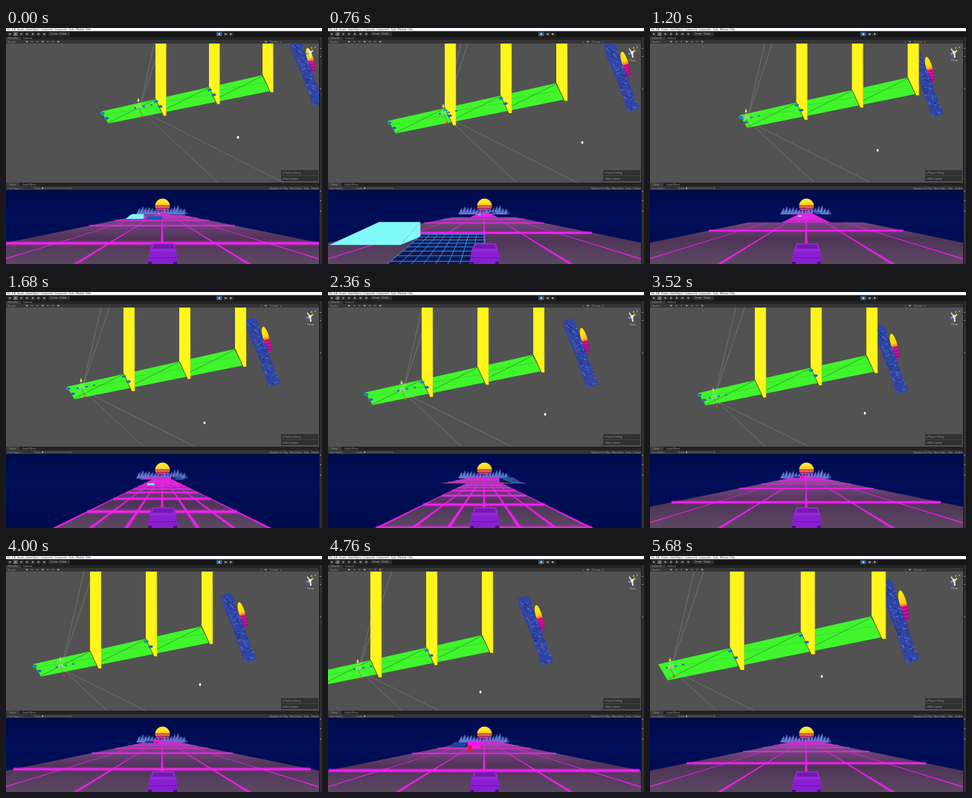
Recreate the animation shown at these times as an HTML page with a canvas. Size 425x319 px, loop 5.72 s.

```html
<!DOCTYPE html>
<html lang="en">
<head>
<meta charset="utf-8">
<title>Retro racer in the editor</title>
<style>
html, body { margin: 0; width: 100%; height: 100%; overflow: hidden; background: #282828; }
canvas { display: block; width: 425px; height: 319px; }
</style>
</head>
<body>
<canvas id="stage" width="425" height="319"></canvas>
<script>
const g = document.getElementById('stage').getContext('2d');
const LOOP = 5720, STEP = 40;

// Per pose: time, first wall x y, zoom, car x y, mountains x y, cursor x y, distance driven
const POSES = [
  [0, 201, 95.5, .96, 178, 107, 404, 60, 312, 148, 0],
  [760, 157, 107.5, 1, 155, 115, 394, 66, 342, 155, 2.6],
  [1680, 158, 110, 1, 101, 129, 344.5, 81, 267, 177, 6.5],
  [3040, 169, 109, 1, 97, 135, 334, 84.5, 317, 154, 11.75],
  [4000, 113, 128, 1, 73, 149, 312, 96.5, 261, 174, 15.94],
  [4760, 57, 140, 1, 40, 152, 278.5, 100.5, 205, 184, 18.98],
  [5680, 107.5, 123.5, 1.27, 27, 150, 334.5, 88, 231, 163, 22.72],
  [5720, 107.5, 123.5, 1.27, 27, 150, 334.5, 88, 231, 163, 22.88]
];
const TILE = [75, -16.5];
const WRAPS = [810, 3000, 5193];
const wrapsAt = t => WRAPS.filter(w => t >= w).length;

const noise = n => { const v = Math.sin(n * 127.1) * 43758.5453; return v - Math.floor(v); };

function poly(points, fill, stroke, width = 1) {
  g.beginPath();
  points.forEach(p => g.lineTo(p[0], p[1]));
  g.closePath();
  if (fill) { g.fillStyle = fill; g.fill(); }
  if (stroke) { g.strokeStyle = stroke; g.lineWidth = width; g.stroke(); }
}
function line(a, b, color, width = 1) {
  g.strokeStyle = color;
  g.lineWidth = width;
  g.beginPath();
  g.moveTo(a[0], a[1]);
  g.lineTo(b[0], b[1]);
  g.stroke();
}
function rect(x, y, w, h, color) { g.fillStyle = color; g.fillRect(x, y, w, h); }
function dot(x, y, r, color) {
  g.fillStyle = color;
  g.beginPath();
  g.arc(x, y, r, 0, 7);
  g.fill();
}
function text(s, x, y, color = '#999', size = 3.2) {
  g.fillStyle = color;
  g.font = size + 'px Inter, Arial, sans-serif';
  g.fillText(s, x, y);
}
function clipTo(x, y, w, h, draw) {
  g.save();
  g.beginPath();
  g.rect(x, y, w, h);
  g.clip();
  draw();
  g.restore();
}
function gradient(y0, y1, ...stops) {
  const fill = g.createLinearGradient(0, y0, 0, y1);
  stops.forEach(([at, color]) => fill.addColorStop(at, color));
  return fill;
}

function poseAt(t) {
  let i = 0;
  while (i < POSES.length - 2 && t >= POSES[i + 1][0]) i++;
  const a = POSES[i], b = POSES[i + 1], u = (t - a[0]) / (b[0] - a[0]);
  const mix = j => a[j] + (b[j] - a[j]) * u;
  // The track jumps one tile ahead at each wrap; remove the jumps before mixing
  const base = (p, j) => p[j] - wrapsAt(p[0]) * TILE[j - 1] * p[3];
  const zoom = mix(3);
  const track = j => base(a, j) + (base(b, j) - base(a, j)) * u + wrapsAt(t) * TILE[j - 1] * zoom;
  return {
    wall: [track(1), track(2)], zoom, tile: wrapsAt(t),
    car: [mix(4), mix(5)], range: [mix(6), mix(7)], cursor: [mix(8), mix(9)], dist: mix(10)
  };
}

function sideRange([x, y], zoom) {
  g.save();
  g.translate(x, y);
  g.scale(1 + (zoom - 1) * .5, 1 + (zoom - 1) * .8);
  g.save();
  g.translate(5.5, -17);
  g.rotate(-.24);
  g.beginPath();
  g.ellipse(0, 0, 4.6, 17.5, 0, 0, 7);
  g.fillStyle = gradient(-18, 18, [0, '#fff200'], [.4, '#ffd400'], [.48, '#ff8a20'], [.53, '#e8108c'], [1, '#c000b0']);
  g.fill();
  for (let i = 0; i < 4; i++) rect(-5, 2 + i * 4, 10, .8, '#8a0870');
  g.restore();
  const at = (u, v) => [17 * u + 7.5 * v, 45 * u - 2 * v];
  const edge = [];
  for (let i = 0; i <= 16; i++) edge.push(at(i / 8 - 1, -.85 - noise(i) * .3));
  for (let i = 16; i >= 0; i--) edge.push(at(i / 8 - 1, .8 + noise(i + 40) * .4));
  poly(edge, '#3145a4');
  for (let i = 0; i < 90; i++) {
    const u = noise(i + 100) * 1.9 - .95, v = noise(i + 300) * 1.7 - .9;
    line(at(u, v), at(u + noise(i) * .1 - .02, v + .4 * noise(i + 7)), i % 2 ? '#1b2872' : '#6a82dc', .8);
  }
  g.restore();
}

function gizmo() {
  line([409, 34], [405, 28], '#ddd', 1.5);
  line([409, 34], [413, 30], '#e8c93a', 2);
  line([409, 34], [410, 40], '#eee', 2);
  line([409, 34], [404, 35], '#58a8f0', 2);
  dot(409, 33, 2, '#f4f4f4');
  dot(411, 27, 1, '#9be04a');
  dot(416, 26, .8, '#ccc');
  text('Persp', 405.5, 45, '#ccc', 3);
}

function sceneView(p) {
  rect(0, 21, 421, 188, '#525252');
  sideRange(p.range, p.zoom);

  const at = (x, y, n = 0) => [p.wall[0] + (x + n * TILE[0]) * p.zoom, p.wall[1] + (y + n * TILE[1]) * p.zoom];
  poly([at(-76, 18), at(0, 0, 2), at(12, 22, 2), at(-66, 35)], '#40f52c');
  for (let n = 0; n < 3; n++) {
    line(at(-66, 34, n), at(0, 1, n), '#1d7d19', .6);
    line(at(-73, 23, n), at(5, 10, n), '#2fc024', .4);
  }
  line(at(0, 0, 2), at(12, 22, 2), '#183c14', 2);

  for (let n = 2; n >= 0; n--) {
    const foot = [at(0, 0, n), at(11, 24, n), at(15, 24, n)];
    poly([[foot[0][0], 20], ...foot, [foot[2][0], 20]], '#fff51c');
    line(foot[0], foot[1], '#4c5a10', .9);
    line([foot[2][0] - .3, 21], foot[2], '#c9c414', .6);
  }
  for (let n = 0; n < 3; n++) {
    if (p.tile + n === 3) continue;
    [[-76, 20], [-70, 27]].forEach(([x, y], i) => {
      const [bx, by] = at(x, y, n);
      poly([[bx - 2, by], [bx + 2, by - 1.5], [bx + 5, by], [bx + 4, by + 2], [bx, by + 3]], i ? '#247fae' : '#1a9ac8');
      line([bx, by + 1], [bx + 4, by], '#155080', .8);
    });
  }

  const [cx, cy] = p.car;
  const ray = 'rgba(205,205,205,.4)';
  [.25, .35].forEach(k => line([cx + 2, cy], [cx + k * (cy - 21), 21], ray, .6));
  [1.05, 1.92].forEach(k => line([cx + 4, cy + 5], [cx + k * (209 - cy), 209], ray, .6));
  [[-6, 0], [6, -2], [16, -4]].forEach(([x, y]) => rect(cx + x, cy + y, 3, 2, '#2678b8'));
  poly([[cx - 3, cy - 1], [cx + 3, cy - 3], [cx + 4, cy + 1], [cx - 2, cy + 2]], '#62e878', '#b5dcae', .6);
  line([cx, cy], [cx, cy - 9], '#a8e83a', .8);
  poly([[cx - 1.7, cy - 8], [cx, cy - 13], [cx + 1.7, cy - 8]], '#e6e86a');
  line([cx, cy], [cx + 5, cy + 11], '#a85c28', .6);
  dot(cx + 5, cy + 13, 1.4, '#e8362a');

  const [mx, my] = p.cursor;
  dot(mx, my, 1.5, '#fff');
  rect(mx - 1, my - 2, 2, 2, '#eee');
  gizmo();

  rect(370, 192, 50, 15, '#303030');
  rect(370, 199, 50, 1, '#434343');
  text('▸ Physics Debug', 372, 197, '#a0a0a0', 3);
  text('▸ Main Camera', 372, 205, '#a0a0a0', 3);
}

// Road space: x across, h height, z depth
const project = (x, h, z) => [210 + 45 * x / z, 247 + (37 - h) / z];
const NEAR = .5, FAR = 12;

function backdrop() {
  rect(0, 219, 421, 100, gradient(219, 319, [0, '#000a4b'], [.35, '#000e59'], [1, '#000b4d']));
  g.beginPath();
  g.arc(210.5, 240.5, 10, 0, 7);
  g.fillStyle = gradient(230, 250, [0, '#fff23a'], [.38, '#ffd62c'], [.55, '#ff8a28'], [.75, '#e82a78'], [1, '#c010a0']);
  g.fill();
  for (let i = 0; i < 4; i++) rect(200, 240 + i * 3, 21, .8, '#7c1560');
  for (let i = 0; i < 15; i++) {
    const x = 180 + i * 4.3, away = Math.abs(x - 210) / 33;
    const top = 251 - 5 - 8 * noise(i + 3) * Math.sin(Math.PI * Math.min(1, away * .8 + .1));
    poly([[x - 5, 252], [x, top], [x + 1, 252]], '#5f78cc');
    poly([[x, top], [x + 5, 252], [x + 1, 252]], '#293a8c');
  }
}

function roadPart(from, to, dist, half, cell, row) {
  const z0 = Math.max(from - dist, NEAR), z1 = Math.min(to - dist, FAR);
  if (z0 >= z1) return;
  const shape = [project(-half, 0, z0), project(-half, 0, z1), project(half, 0, z1), project(half, 0, z0)];
  poly(shape, gradient(249, 319, [0, '#9a4aa6'], [.15, '#7b4786'], [.5, '#4e3557'], [1, '#5c4863']));
  // A vertical wedge from the near edge to the far one
  const wedge = (x, size, color) => {
    const a = project(x, 0, z0), b = project(x, 0, z1), w = size / z0 / 2, v = size / z1 / 2;
    poly([[a[0] - w, a[1]], [b[0] - v, b[1]], [b[0] + v, b[1]], [a[0] + w, a[1]]], color);
  };
  const count = Math.floor(half / cell - .01);
  for (let i = -count; i <= count; i++) {
    wedge(i * cell, 4.5, 'rgba(245,30,240,.25)');
    wedge(i * cell, 2.2, '#f51df2');
  }
  for (let n = Math.ceil((z0 + dist - .84) / row); n * row + .84 < z1 + dist; n++) {
    const z = n * row + .84 - dist;
    if (z < z0) continue;
    const a = project(-half, 0, z), b = project(half, 0, z), w = Math.min(3.2, 2.6 / z);
    line(a, b, 'rgba(245,30,240,.25)', w * 2.2);
    line(a, b, '#f820f4', w);
  }
}

// A sloped block: [left, right] at the front and at the back, height at the back
function ramp(dist, front, back, z, depth, height, fill, wire) {
  const zb = z + depth - dist, zf = Math.max(z - dist, .35);
  if (zb < .42 || zf > FAR) return;
  const at = (u, v) => {
    const x = (front[0] + (front[1] - front[0]) * u) * (1 - v) + (back[0] + (back[1] - back[0]) * u) * v;
    return project(x, height * v, zf + (zb - zf) * v);
  };
  const inner = front[0] > 0 ? 0 : 1;
  const steps = [0, .2, .4, .6, .8, 1];
  poly([at(inner, 0), ...steps.map(v => at(inner, v)), project(back[inner], 0, zb)], wire ? '#0c1c52' : fill);
  poly([...steps.map(v => at(0, v)), ...steps.map(v => at(1, 1 - v))], fill);
  if (!wire) return;
  const w = Math.min(1, 1.1 / zb);
  for (let i = 0; i <= 8; i++) {
    line(at(i / 8, 0), at(i / 8, 1), wire, w);
    line(at(0, i / 8), at(1, i / 8), wire, w);
  }
}

function block(dist, x0, x1, z, height, fill) {
  const d = z - dist;
  if (d < .4 || d > FAR) return;
  poly([project(x0, 0, d), project(x0, height, d), project(x1, height, d), project(x1, 0, d)], fill);
}

function car() {
  poly([[197, 291], [226, 291], [229, 300], [231, 319], [190, 319], [193, 300]], '#8a1fd0');
  poly([[198, 292], [225, 292], [227, 299], [196, 299]], '#7418b0', '#a93fe0', .7);
  line([193, 301], [229, 301], '#a638e0', .8);
  rect(193, 310, 36, 1, '#6d14a4');
  rect(191, 316, 5, 3, '#4d1278');
  rect(225, 316, 5, 3, '#4d1278');
}

function gameView(d) {
  backdrop();
  roadPart(12.2, 99, d, 4, 4 / 3, 1);
  roadPart(6.8, 12.2, d, 1.66, .55, .4);
  roadPart(-9, 6.8, d, 4, 4 / 3, 1);

  ramp(d, [-3.7, -2], [-3.3, -2], 3.4, .25, 21, '#80fbfa');
  ramp(d, [-1.45, 0], [-1.5, 0], 3.08, .33, 11, '#11194e', '#2f8df2');
  block(d, -1.15, -.6, 9.1, 7, '#78eef2');
  block(d, .95, 1.5, 9.1, 7, '#f51de8');
  ramp(d, [2.8, 3.7], [1.67, 3.15], 12.38, .37, 23, '#11285f', '#3a86d8');
  ramp(d, [-3.2, -1.9], [-3.2, -1.7], 22.1, .4, 19, '#162c7c', '#3560c0');
  block(d, -1.4, -.3, 21.83, 26, '#ff12ee');
  block(d, -1, -.75, 21.1, 18, '#e8162e');
  car();
}

function chrome() {
  rect(0, 0, 425, 319, '#282828');
  rect(0, 0, 425, 4.5, '#fafafa');
  text('File  Edit  Assets  GameObject  Component  Component  Tools  Window  Help', 1, 3.3, '#333', 3.1);
  rect(0, 4.5, 425, 7.5, '#151515');
  for (let i = 0; i < 7; i++) {
    rect(2 + i * 7.7, 5.5, 6.5, 5.5, i === 1 ? '#585858' : '#2c2c2c');
    rect(4.2 + i * 7.7, 7.2, 2, 2, '#a5a5a5');
  }
  rect(57, 5.5, 29, 5.5, '#303030');
  text('Center   Global', 60, 9.4, '#bbb', 3);
  [283, 291.5, 299].forEach((x, i) => rect(x, 5.5, 7.5, 5.5, i ? '#262626' : '#35618a'));
  poly([[286, 6.7], [288.5, 8.2], [286, 9.7]], '#fff');
  rect(294, 7, .8, 2.6, '#ddd');
  rect(295.8, 7, .8, 2.6, '#ddd');
  poly([[301.5, 6.8], [304, 8.2], [301.5, 9.8]], '#ddd');

  rect(0, 12, 425, 4, '#222');
  rect(0, 12, 20, 4, '#3c3c3c');
  text('# Scene', 3, 15.3);
  text('Console', 23, 15.3);
  rect(0, 16, 425, 5, '#353535');
  text('Shaded', 2, 19.8);
  for (let i = 0; i < 7; i++) rect(27 + i * 7, 17.5, 2.5, 2, i % 3 ? '#666' : '#999');
  text('▾', 343, 20, '#999', 3);
  rect(348, 17.5, 3, 2, '#888');
  text('Gizmos   ▾', 355, 19.8);

  rect(0, 209, 425, 5, '#222');
  rect(0, 209, 18, 5, '#3c3c3c');
  text('Game', 4, 213);
  text('Audio Mixer', 22, 213);
  rect(0, 214, 425, 5, '#353535');
  text('Free Aspect', 2, 217.8);
  text('Scale', 38, 217.8);
  rect(48, 216.3, 36, .7, '#666');
  dot(49, 216.6, 1.1, '#bbb');
  text('1x', 85, 217.8);
  text('Maximize On Play   Mute Audio   Stats   Gizmos', 354, 217.8, '#999', 3);
  rect(421, 12, 4, 307, '#303030');
  rect(421, 12, 1, 307, '#191919');
  for (const y of [27, 38, 82, 220, 233, 247]) rect(422, y, 2, 1, '#8a8a8a');
}

function frame(now) {
  const t = Math.floor(now % LOOP / STEP) * STEP;
  const pose = poseAt(t);
  chrome();
  clipTo(0, 21, 421, 188, () => sceneView(pose));
  clipTo(0, 219, 421, 100, () => gameView(pose.dist));
  requestAnimationFrame(frame);
}
requestAnimationFrame(frame);
</script>
</body>
</html>
```
